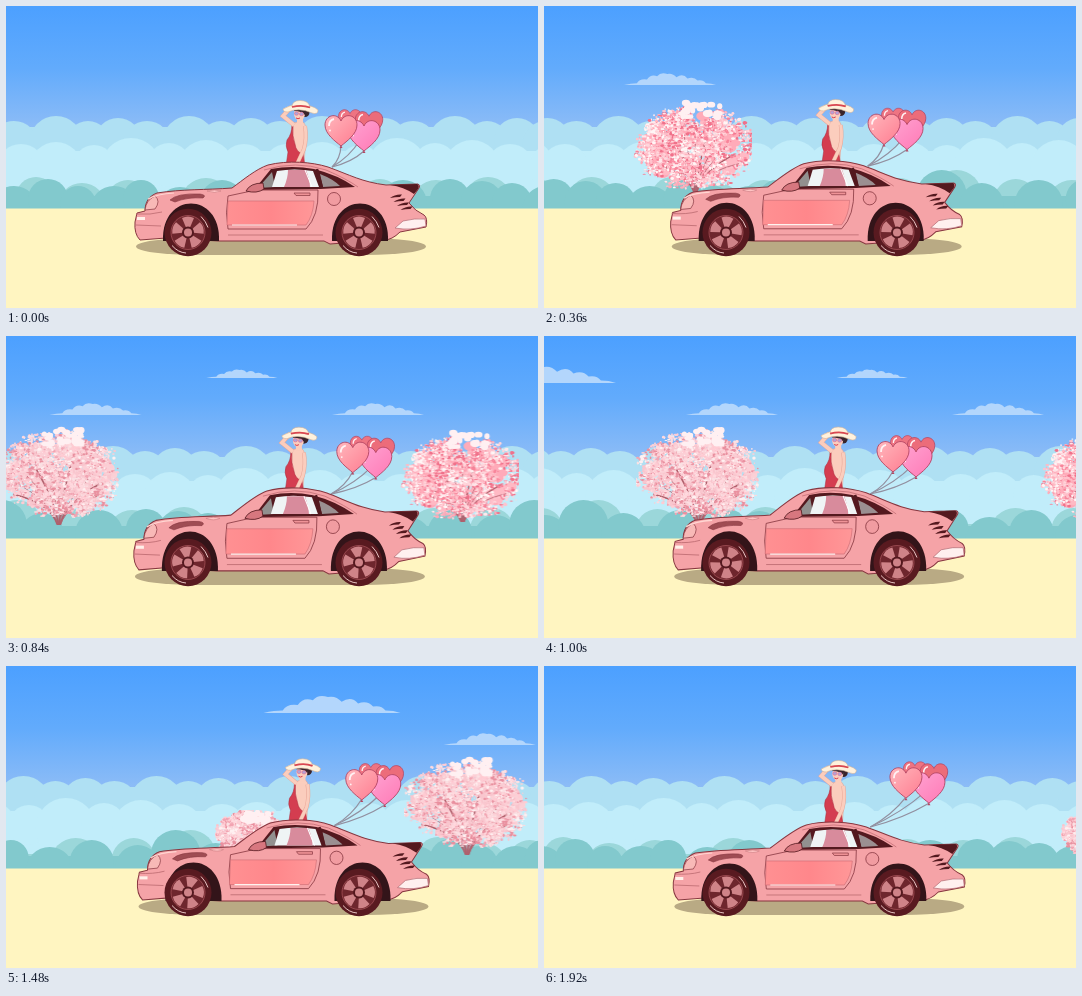
An HTML page with a canvas for the animation above (1.96 s loop, 532x302 px).

```html
<!DOCTYPE html>
<html lang="en">
<head>
<meta charset="utf-8">
<title>Seaside drive</title>
<style>
html, body { margin: 0; width: 100%; height: 100%; overflow: hidden; }
canvas { display: block; }
</style>
</head>
<body>
<canvas id="stage" width="532" height="302"></canvas>
<script>
const LOOP = 1960, STEP = 40, TAU = Math.PI * 2;
const stage = document.getElementById('stage');
const ctx = stage.getContext('2d');
const DARK = '#54191f', LINE = '#873740', SKIN = '#fbcdbd';

function shape(d, fill, stroke, width = 0.8) {
  const p = new Path2D(d);
  if (fill) { ctx.fillStyle = fill; ctx.fill(p); }
  if (stroke) { ctx.strokeStyle = stroke; ctx.lineWidth = width; ctx.stroke(p); }
}

function oval(x, y, rx, ry, fill, stroke, c = ctx) {
  c.beginPath();
  c.ellipse(x, y, rx, ry, 0, 0, TAU);
  if (fill) { c.fillStyle = fill; c.fill(); }
  if (stroke) { c.strokeStyle = stroke; c.lineWidth = 0.8; c.stroke(); }
}

function at(x, y, draw, sx = 1, sy = sx) {
  ctx.save();
  ctx.translate(x, y);
  ctx.scale(sx, sy);
  draw();
  ctx.restore();
}

function gradient(x0, y0, x1, y1, ...colors) {
  const g = ctx.createLinearGradient(x0, y0, x1, y1);
  colors.forEach((c, i) => g.addColorStop(i / (colors.length - 1), c));
  return g;
}

function randomizer(seed) {
  return () => (seed = (seed * 16807) % 2147483647) / 2147483647;
}

// Blossom tree painted once; a crown wider than the canvas is cut at its edge.
function makeTree(seed, w, h, cx, cy, colors) {
  const canvas = document.createElement('canvas');
  canvas.width = w;
  canvas.height = h;
  const c = canvas.getContext('2d'), rnd = randomizer(seed);
  const inCrown = (spread) => {
    const a = rnd() * TAU, r = Math.sqrt(rnd()) * spread;
    return [w * (cx + Math.cos(a) * r * 0.46), h * (cy + Math.sin(a) * r * 0.4)];
  };
  for (let i = 0; i < 110; i++) {
    const [x, y] = inCrown(0.9);
    oval(x, y, w * 0.055, h * 0.05, colors[2 + i % 2], null, c);
  }
  c.strokeStyle = '#b0606c';
  for (let i = 0; i < 11; i++) {
    const a = (i / 10 - 0.5) * 2.3;
    c.lineWidth = i % 3 ? 0.8 : 1.6;
    c.beginPath();
    c.moveTo(w * cx + (i - 5) * 0.3, h);
    c.quadraticCurveTo(w * (cx + a * 0.06), h * 0.78, w * (cx + Math.sin(a) * 0.4), h * (0.9 - Math.cos(a) * 0.5));
    c.stroke();
  }
  for (let i = 0; i < 190; i++) {
    const [x, y] = inCrown(1);
    const tone = Math.floor(rnd() * colors.length);
    for (let k = 0; k < 15; k++) {
      const pick = rnd() < 0.55 ? tone : Math.floor(rnd() * colors.length);
      oval(x + (rnd() - 0.5) * w * 0.12, y + (rnd() - 0.5) * h * 0.12,
        0.6 + rnd() * 1.5, 0.5 + rnd() * 1.1, colors[pick], null, c);
    }
  }
  for (let i = 0; i < 30; i++) {
    oval(w * (cx - 0.12 + rnd() * 0.32), h * (0.05 + rnd() * 0.16), 2 + rnd() * 2.5, 2 + rnd() * 1.5, '#fff0f2', null, c);
  }
  return canvas;
}

const vivid = ['#ffe9ec', '#ffc3cd', '#ffabb9', '#ffb9c4', '#f8849a', '#f0718a', '#ffd5db', '#fff6f6'];
const pale = ['#fff0f1', '#ffd9de', '#f9c6ce', '#fbd0d6', '#f2a4b2', '#e9909f', '#fbe0e3', '#ffcbd3'];
// Left edge at a given moment, top, and speed in px per ms.
const trees = [
  { img: makeTree(71, 123, 94, 0.54, 0.53, vivid), x: 85, t: 360, y: 92, v: 0.636 },
  { img: makeTree(223, 126, 101, 0.5, 0.5, pale), x: 92, t: 1000, y: 88, v: 0.638 },
  { img: makeTree(907, 76, 57, 0.5, 0.44, pale), x: 97, t: 1320, y: 144, v: 0.7 }
];
const clouds = [
  { x: 80, t: 360, y: 68, w: 92, h: 11, v: 0.5125 },
  { x: 108, t: 680, y: 34, w: 71, h: 8, v: 0.577 },
  { x: 142, t: 1000, y: 68, w: 92, h: 11, v: 0.616 },
  { x: 150, t: 1320, y: 31, w: 137, h: 16, v: 0.672 }
];

// Rows of bumps: x, top, radius.
const bands = [
  { color: '#afe0f3', period: 133, base: 121,
    bumps: [[8, 115, 24], [50, 110, 27], [82, 115, 22], [112, 112, 23]] },
  { color: '#c1edfa', period: 266, base: 145,
    bumps: [[15, 138, 24], [50, 136, 26], [88, 139, 20], [125, 132, 30], [163, 137, 22], [200, 134, 28], [238, 138, 24]] },
  { color: '#9bd7da', period: 532, base: 188,
    bumps: [[30, 171, 20], [76, 177, 24], [122, 174, 22], [200, 172, 26], [258, 172, 22], [315, 164, 25], [374, 173, 22], [430, 174, 25], [482, 171, 24]] },
  { color: '#82c9cd', period: 532, base: 190,
    bumps: [[8, 180, 24], [42, 173, 20], [72, 180, 18], [108, 180, 24], [135, 174, 18], [174, 181, 24], [216, 174, 22], [262, 179, 22], [300, 164, 25], [340, 177, 22], [397, 174, 24], [444, 173, 20], [476, 175, 21], [506, 177, 20]] }
];

function drawBand({ color, period, base, bumps }, u) {
  ctx.fillStyle = color;
  ctx.fillRect(0, base, 532, 203 - base);
  for (let x0 = u * period - period; x0 < 560; x0 += period)
    for (const [x, y, r] of bumps) oval(x0 + x, y + r, r, r, color);
}

function drawCloud({ x, t, y, w, h, v }, now) {
  at(x + (now - t) * v, y, () => shape(
    'M0 10Q8 8.5 14 8.5Q17 4 25 5Q29 0 36 2Q40 -2 47 0Q53 -1 57 3Q64 -1 69 4Q76 2 80 6Q86 5 89 8.5Q95 8.5 100 10Z',
    '#b3d6fc'), w / 100, h / 10);
}

function drawHeart(x, y, size, fill) {
  at(x, y, () => {
    shape('M0 16C-6 11 -16 4 -16 -5C-16 -15 -4 -18 0 -9C4 -18 16 -15 16 -5C16 4 6 11 0 16Z', fill, '#b34562', 0.9);
    shape('M-12 -4Q-12 -10 -7 -11', null, '#fff2f4', 1.8);
    shape('M-1.5 18L0 15.5L1.5 18Z', '#b34562');
    oval(-11, 0.5, 0.9, 0.9, '#fff2f4');
  }, size);
}

function drawBalloons(u, dx, dy) {
  const x = 27.5 * u, y = -8 * u;
  const ax = 326 + dx, ay = 161 + dy;
  const knots = [[335 + x, 139 + y], [354 + x, 134 + y], [358 + x, 145 + y]];
  for (const [kx, ky] of knots) {
    shape(`M${ax} ${ay}Q${(ax + kx) / 2 + 4} ${(ay + ky) / 2 + 3} ${kx} ${ky}`, null, '#9290a0', 1.2);
  }
  drawHeart(344 + x, 114 + y, 0.72, '#ee7482');
  drawHeart(363 + x, 118 + y, 0.86, '#ec6c7a');
  drawHeart(358 + x, 129 + y, 1, gradient(-14, -12, 12, 14, '#ffa0d0', '#ff7eb8'));
  drawHeart(335 + x, 124 + y, 1, gradient(-14, -12, 12, 14, '#ffb3b9', '#ff8295'));
}

function drawWoman() {
  shape('M286 118Q291 115 297 116Q301 119 300 130L298 158H284Q285 140 286 118Z', SKIN, '#dc9b8f', 0.5);
  shape('M286 119Q286 128 281 134Q279 140 282 146L280 160H299L297 148Q290 146 289 138Q286 130 287 120Z', '#d43d50', '#a92a3d', 0.5);
  shape('M299 120Q301 132 298 143L291 158', null, '#e6a697', 4);
  shape('M299 120Q301 132 298 143L291 158', null, SKIN, 3);
  shape('M288 119L277 110L285 101', null, '#e6a697', 4.4);
  shape('M288 119L277 110L285 101', null, SKIN, 3.6);
  shape('M291 111H297V118H291Z', SKIN);
  oval(299, 106.5, 4.5, 4.5, '#3a242b');
  oval(293.5, 108, 5.5, 6.5, SKIN);
  shape('M288 104Q296 101 300 104L299 109Q296 105 288 105Z', '#3a242b');
  oval(290.5, 107.5, 2, 1.7, '#b3a3d6', '#e07a9c');
  oval(295.5, 108, 2, 1.7, '#b3a3d6', '#e07a9c');
  shape('M290 112Q292 113.5 294 112', null, '#d73c4d', 1);
  shape('M277 103Q285 98 294 98.5Q307 99 312 104Q312 109 306 107Q293 101 282 106Q277 106 277 103Z', '#fff1dc', '#d2b29b', 0.6);
  shape('M286 101Q286 94.5 294 94.5Q303 94.5 304 101.5Q296 99 286 101Z', '#fff1dc', '#d2b29b', 0.6);
  shape('M286 101Q296 98.5 304 101.5', null, '#d94651', 1.8);
}

function drawArch(x) {
  shape(`M${x - 28} 235C${x - 30} 185 ${x + 30} 185 ${x + 28} 235Z`, '#331419');
}

function drawBody() {
  shape('M129 216L131 207L139 205C139 196 143 190 151 187C176 183 200 184 226 182' +
    'C237 174 250 163 262 159C282 154 306 156 322 161C344 169 356 176 380 179' +
    'L412 178Q415 179 413 182L403 197Q409 205 418 209Q422 212 420 221' +
    'L394 226Q386 234 378 234L324 238L318 235L212 235L160 232L134 234Q128 228 129 216Z', '#f5a3a7', LINE, 1);
  drawArch(185);
  drawArch(354);
  // Windows
  shape('M248 184L265 163Q286 159 308 163Q332 169 349 181L314 183Z', DARK);
  shape('M252 182L266 166L269 181Z', '#92908f');
  shape('M266 181L271 165Q288 162 307 165L313 181Z', '#eff4f5');
  shape('M282 164H300Q304 174 304 181H278Q282 172 282 164Z', '#d88b9c');
  shape('M299 164L306 181', null, '#fff', 1);
  shape('M314 168Q327 173 334 180L317 181Z', '#9b8f91');
  shape('M311 163L316 182', null, DARK, 2.5);
  shape('M258 164Q290 154 320 164Q341 173 352 181', null, '#c46f76');
  // Door
  shape('M250 184L222 190Q219 207 222 223H300Q313 210 312 184Z', null, LINE);
  shape('M222 195H308Q307 210 300 219H221Z', gradient(222, 0, 308, 0, '#ff9092', '#ff878b', '#ff9798'), '#cc6b73', 0.6);
  shape('M226 219H291', null, '#fff2ef', 1.2);
  shape('M288 187H304V189.5H290Z', '#ef9397', LINE, 0.7);
  shape('M240 185Q244 177 257 177L258 183Q251 188 240 185Z', '#d7777f', DARK);
  // Nose
  shape('M164 194Q171 187 194 188Q201 189 197 192Q181 191 169 196Z', '#9f4c53', LINE, 0.6);
  shape('M201 185Q209 183 215 185Q209 188 201 185Z', '#ffc3c3', '#cc7b80', 0.6);
  shape('M139 204Q140 194 149 190Q155 195 149 203Z', '#f8b9b7', LINE, 0.7);
  shape('M130 208Q145 209 156 206M130 219L155 220M222 229L317 229', null, '#bb6a70', 0.8);
  shape('M131 211H139V214H131Z', '#fff0e9');
  shape('M142 193Q151 188 168 187', null, '#ffd6d2', 1.2);
  // Tail
  oval(328, 193, 6.5, 6.5, '#f19ca1', LINE);
  shape('M384 179L411 178Q414 179 412 183L408 188Q398 181 384 179Z', DARK);
  for (let i = 0; i < 4; i++) {
    const x = 384 + i * 3.5, y = 192 + i * 4;
    shape(`M${x} ${y}Q${x + 5} ${y - 4} ${x + 12} ${y - 3.5}L${x + 10} ${y - 1}Q${x + 5} ${y - 1} ${x} ${y}Z`, DARK);
  }
  shape('M389 222L397 215Q409 212 419 213L420 220Q405 225 389 222Z', '#fff0ef', '#b26b73', 0.7);
}

function drawWheel(x, turn) {
  at(x, 226.5, () => {
    oval(0, 0, 23.5, 23.8, '#591a20');
    oval(0, 0, 17, 17, '#6e262d', '#a45157');
    ctx.save();
    ctx.rotate(turn);
    for (let i = 0; i < 5; i++) {
      shape('M-2 -5L-6 -14.5Q0 -17.5 6 -14.5L2 -5Z', '#cf8388');
      ctx.rotate(TAU / 5);
    }
    ctx.restore();
    oval(0, 0, 6, 6, DARK);
    oval(0, 0, 4, 4, '#cf8388');
    shape('M-16 13Q-10 20 -2 20.5M13 -16Q18 -11 20 -5', null, '#e8c5c4', 1);
  });
}

function draw(now) {
  const u = now / LOOP;
  const dx = -2.5 * Math.sin(TAU * u);
  const lift = (1 - Math.cos(TAU * u)) / 2;

  ctx.fillStyle = gradient(0, 0, 0, 125, '#4ca0ff', '#62abfc', '#8fbdf6');
  ctx.fillRect(0, 0, 532, 203);
  clouds.forEach(c => drawCloud(c, now));
  bands.forEach(b => drawBand(b, u));
  ctx.fillStyle = '#fff5c1';
  ctx.fillRect(0, 202.5, 532, 100);
  for (const { img, x, t, y, v } of trees) ctx.drawImage(img, x + (now - t) * v, y);

  ctx.fillStyle = '#b9aa84';
  ctx.beginPath();
  ctx.roundRect(130 + dx, 232, 290, 17, [{ x: 60, y: 8.5 }]);
  ctx.fill();
  at(dx, -3.5 * lift, drawWoman);
  drawBalloons(u, dx, -3 * lift);
  const stretch = 1 + 0.055 * lift;
  at(dx, 237 * (1 - stretch), drawBody, 1, stretch);
  drawWheel(182, -TAU * u);
  drawWheel(353, -TAU * u);
}

function tick() {
  draw(Math.floor(performance.now() % LOOP / STEP) * STEP);
  requestAnimationFrame(tick);
}
tick();
</script>
</body>
</html>
```
